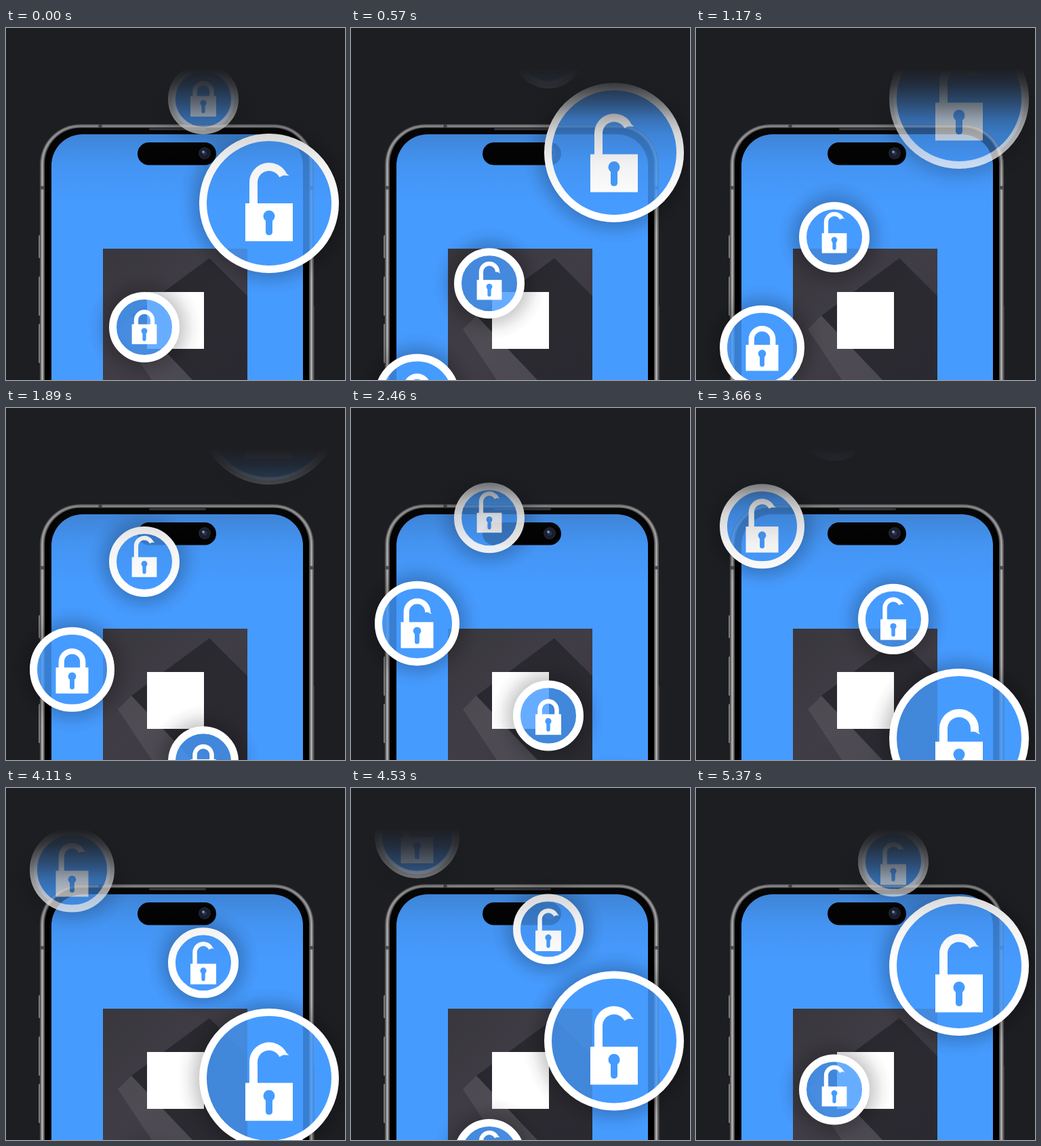
Recreate the animation shown at these times as an HTML page. Size 500 by 520 pixels, loop 5.4 s.

```html
<!DOCTYPE html>
<html lang="en">
<head>
<meta charset="utf-8">
<title>Rising locks</title>
<style>
  html, body { margin: 0; width: 100%; height: 100%; overflow: hidden; background: #1d1e22; }
  svg { display: block; width: 500px; height: 520px; }
</style>
</head>
<body>
<svg viewBox="0 0 500 520">
  <defs>
    <linearGradient id="fade" gradientUnits="userSpaceOnUse" x1="0" y1="60" x2="0" y2="260">
      <stop offset="0" stop-color="#1d1e22"/>
      <stop offset=".12" stop-color="#1d1e22" stop-opacity=".86"/>
      <stop offset=".265" stop-color="#1d1e22" stop-opacity=".58"/>
      <stop offset=".37" stop-color="#1d1e22" stop-opacity=".34"/>
      <stop offset=".485" stop-color="#1d1e22" stop-opacity=".18"/>
      <stop offset=".7" stop-color="#1d1e22" stop-opacity=".06"/>
      <stop offset="1" stop-color="#1d1e22" stop-opacity="0"/>
    </linearGradient>
    <linearGradient id="card" x1="0" y1="0" x2="1" y2="1">
      <stop offset="0" stop-color="#39373d"/>
      <stop offset=".5" stop-color="#403d46"/>
      <stop offset="1" stop-color="#35333d"/>
    </linearGradient>
    <linearGradient id="cast" x1="0" y1="0" x2="1" y2="1">
      <stop offset="0" stop-color="#1f1f24" stop-opacity=".75"/>
      <stop offset="1" stop-color="#1f1f24" stop-opacity=".5"/>
    </linearGradient>
    <radialGradient id="lens">
      <stop offset="0" stop-color="#33436b"/>
      <stop offset=".55" stop-color="#161c30"/>
      <stop offset="1" stop-color="#24262e"/>
    </radialGradient>
  </defs>

  <g id="backs"></g>

  <!-- phone -->
  <g fill="#77777a">
    <rect x="48" y="306" width="4" height="34" rx="1.5"/>
    <rect x="48" y="367" width="4" height="58" rx="1.5"/>
    <rect x="48" y="437" width="4" height="58" rx="1.5"/>
    <rect x="452" y="410" width="3" height="120" rx="1" fill="#3d3d41"/>
  </g>
  <rect x="50" y="142" width="404" height="460" rx="60" fill="#5d5d60"/>
  <rect x="53.500" y="145" width="397" height="460" rx="56" fill="none" stroke="#a9a7a5" stroke-width="3"/>
  <path d="M50 236h8M446 236h8M139 142v5" stroke="#4b4b50" stroke-width="5"/>
  <rect x="57" y="147.500" width="390" height="460" rx="53"/>
  <rect x="211" y="148" width="84" height="3" rx="1.500" fill="#3a3a3e"/>
  <rect x="67" y="157" width="371" height="460" rx="46" fill="#469bff"/>
  <rect x="194" y="169" width="116" height="33.500" rx="16.700"/>
  <circle cx="293" cy="185" r="9" fill="url(#lens)"/>
  <circle cx="291" cy="183" r="2" fill="#8b9cbd"/>

  <!-- card -->
  <rect x="143" y="326" width="213" height="200" fill="url(#card)"/>
  <path d="M185 425L275 520H215L165 445Z" fill="#6a676e" opacity=".35"/>
  <path d="M185 425L300 340 356 396V520H275Z" fill="url(#cast)"/>
  <rect x="208" y="390" width="84" height="84" fill="#fff"/>

  <g id="bubbles"></g>
  <rect width="500" height="260" fill="url(#fade)"/>
</svg>

<script>
const LOOP = 5400, STEP = 30, BLUE = '#469bff', GLOW = 32;
const NEVER = 1e5, ALWAYS = -1e5;

// y: start height, run: distance per loop, s: lock scale, k: lock drift per ms.
// drop and open hold one value for each lap: lock offset and time of unlocking.
const bubbles = [
  { x: 291, r: 52, y: 105, run: 642, s: .543, k: .0021, drop: [-4.5, 4], open: [NEVER, 3100] },
  { x: 204, r: 52, y: 442, run: 614, s: .525, k: -.0013, drop: [-4.3, -4.5], open: [300, ALWAYS] },
  { x: 97.5, r: 62.5, y: 612, run: 645, s: .686, k: .0018, drop: [-6.3, 0], open: [2200, NEVER] },
  { x: 388, r: 103, y: 259, run: 711, s: 1, k: .0045, drop: [0, 12.6], open: [ALWAYS, 3450] }
];

const clamp = v => Math.max(0, Math.min(1, v));
const smooth = v => v * v * (3 - 2 * v);

// The shackle rises while its free end gets shorter. The origin is the top of the body.
function drawShackle(p, bow, beak) {
  const R = 23, cy = -12 - 19 * p, end = 14 - 24.5 * p;
  const a = Math.min(0, end / R), c = Math.cos(a), s = Math.sin(a);
  const x = R * c, y = cy + R * s, tip = y + Math.max(0, end);
  bow.setAttribute('d', `M${-R} 2V${cy}A${R} ${R} 0 0 1 ${x} ${y}V${tip}`.replace(end > 0 ? '' : /V[^V]*$/, ''));
  beak.setAttribute('d', `M${x} ${tip}l${6 * c} ${6 * s}l${2 * c - 4 * s} ${2 * s + 4 * c}Z`);
  beak.setAttribute('opacity', clamp(p * 4));
}

const backs = document.getElementById('backs');
const layer = document.getElementById('bubbles');

// These show only beside the phone, so a bubble is solid over the page background.
backs.innerHTML = bubbles.map(b => `<circle cx="${b.x}" r="${b.r - 6}" fill="${BLUE}"/>`).join('');

layer.innerHTML = bubbles.map(({ r, s }, i) => {
  const R = r + GLOW, stop = (d, o) => `<stop offset="${(r + d) / R}" stop-opacity="${o}"/>`;
  return `<g>
    <radialGradient id="glow${i}">${stop(-2, 0)}${stop(-2, .2)}${stop(10, .11)}${stop(20, .04)}${stop(GLOW, 0)}</radialGradient>
    <circle r="${R}" fill="url(#glow${i})"/>
    <circle r="${r - 10}" fill="${BLUE}" fill-opacity=".82"/>
    <circle r="${r - 5.5}" fill="none" stroke="#fff" stroke-width="11"/>
    <g class="lock" fill="#fff">
      <path class="bow" fill="none" stroke="#fff" stroke-width="12"/>
      <path class="beak"/>
      <rect x="-35" width="70" height="56"/>
      <g fill="${BLUE}"><circle cy="19" r="8.5"/><rect x="-5" y="22" width="10" height="25" rx="4.5"/></g>
    </g>
  </g>`;
}).join('');

const nodes = [...layer.children].map((g, i) => ({
  g, back: backs.children[i], lock: g.querySelector('.lock'),
  bow: g.querySelector('.bow'), beak: g.querySelector('.beak')
}));

function draw(t) {
  bubbles.forEach((b, i) => {
    let y = b.y - b.run * t / LOOP;
    const lap = y + b.run < 545 + b.r ? 1 : 0;
    if (lap) y += b.run;
    const drop = b.drop[lap] + b.k * (lap ? t - LOOP : t);
    const alpha = clamp((y + b.r) / (b.r + 172));
    const { g, back, lock, bow, beak } = nodes[i];
    g.setAttribute('transform', `translate(${b.x} ${y})`);
    g.setAttribute('opacity', alpha);
    back.setAttribute('cy', y);
    back.setAttribute('opacity', alpha);
    lock.setAttribute('transform', `translate(0 ${drop}) scale(${b.s})`);
    drawShackle(smooth(clamp((t - b.open[lap]) / 500)), bow, beak);
  });
}

const start = performance.now();
function frame() {
  const t = (performance.now() - start) % LOOP;
  draw(Math.floor(t / STEP) * STEP);
  requestAnimationFrame(frame);
}
frame();
</script>
</body>
</html>
```
